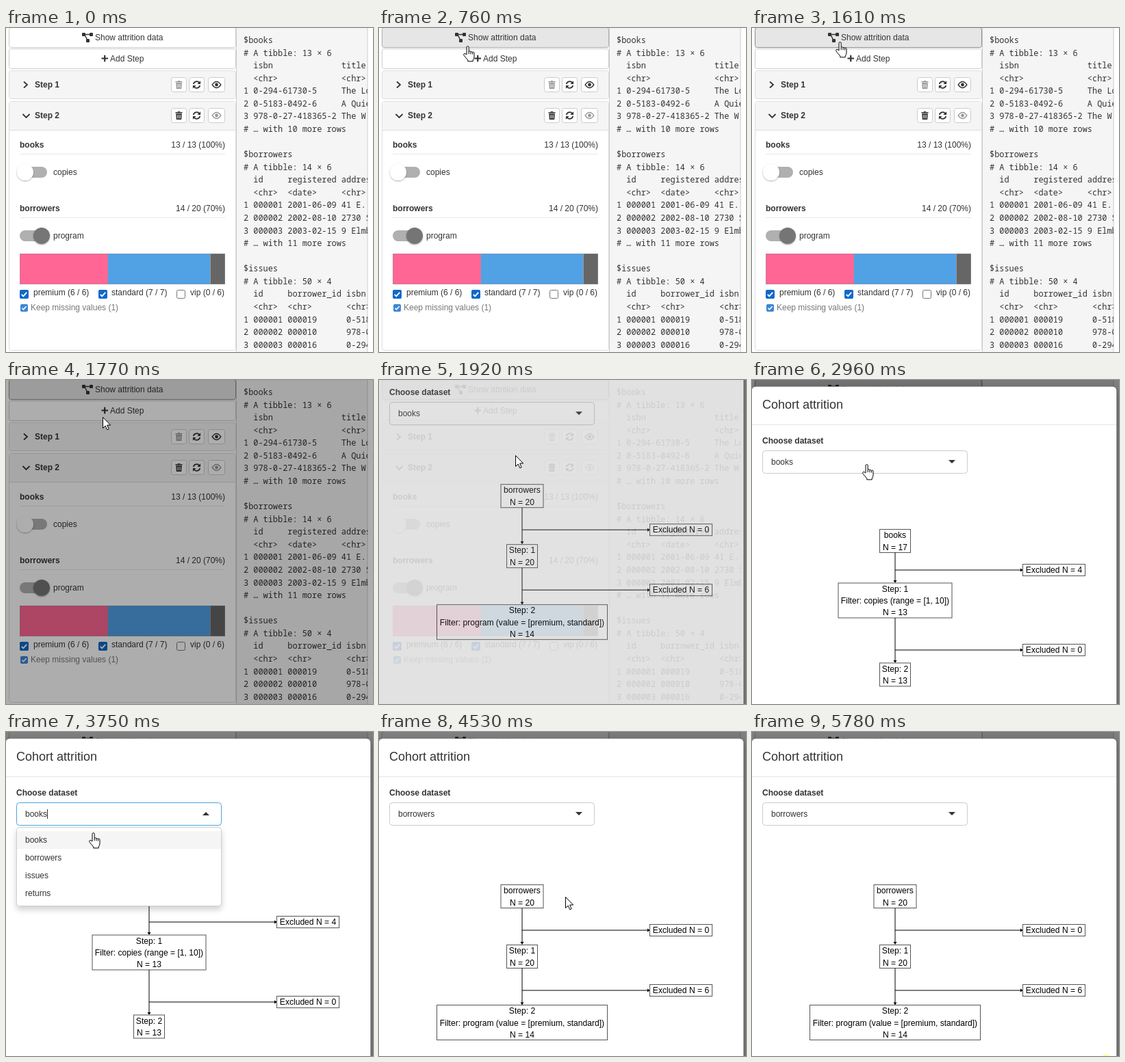
These frames come from a looping animation (536x474 px, 5850 ms). An HTML page:

```html
<!DOCTYPE html>
<html lang="en">
<head>
<meta charset="utf-8">
<title>Cohort attrition</title>
<style>
html, body { margin: 0; width: 100%; height: 100%; overflow: hidden; background: #fff; }
svg { display: block; font: 12px "Liberation Sans", Arial, sans-serif; fill: #333; }
text { white-space: pre; }
.b { font-weight: bold; }
.mono { font: 11.91px "Noto Sans Mono", "DejaVu Sans Mono", monospace; }
.line { fill: none; stroke: #333; stroke-width: 1.8; }
.graph { font-size: 12.1px; fill: #000; text-anchor: middle; }
.graph rect, .graph .edge { fill: none; stroke: #000; }
.graph rect { stroke: #555; }
</style>
</head>
<body>
<svg id="stage" width="536" height="474" viewBox="0 0 536 474"></svg>
<script>
const LOOP = 5850;

const text = (x, y, s, attrs = '') => `<text x="${x}" y="${y}" ${attrs}>${s}</text>`;
const rect = (x, y, w, h, fill, attrs = '') =>
  `<rect x="${x}" y="${y}" width="${w}" height="${h}" fill="${fill}" ${attrs}/>`;
const path = (d, attrs = '') => `<path d="${d}" ${attrs}/>`;
const at = (x, y, s, attrs = '') => `<g transform="translate(${x} ${y})" ${attrs}>${s}</g>`;

// Icons, centred on their own origin
const trash = path('M-5-5H-2L-1-6H1L2-5H5V-3.6H-5ZM-4.3-2.8H4.3L3.7 6H-3.7Z')
  + path('M-2-1V4.3M0-1V4.3M2-1V4.3', 'stroke="#fff" stroke-width=".8"');
const refresh = path('M-4.8-1A4.9 4.9 0 0 1 3.8-3M4.8 1A4.9 4.9 0 0 1-3.8 3', 'class="line"')
  + path('M5.6-5.8V-1H.8ZM-5.6 5.8V1H-.8Z');
const eye = path('M-6.3 0Q0-9 6.3 0Q0 9-6.3 0Z', 'class="line" style="stroke-width:1.4"')
  + '<circle r="2.4"/>';
const flow = path('M-5-4.5H4M-4-4L0 4', 'class="line" style="stroke-width:1.5"')
  + rect(-8, -7, 5, 5, '#333', 'rx="1"') + rect(3, -7, 5, 5, '#333', 'rx="1"')
  + rect(-2, 2, 5, 5, '#333', 'rx="1"');

const iconButton = (x, y, w, icon, off) =>
  rect(x + .5, y - 10.5, w, 21, '#fff', 'rx="3" stroke="#ccc"')
  + at(x + .5 + w / 2, y, icon, off ? 'opacity=".5"' : '');

const stepHead = (y, n, chevron, trashOff, eyeOff) =>
  path(chevron, 'class="line"') + text(42, y + 4, 'Step ' + n, 'class="b"')
  + iconButton(241, y, 22, trash, trashOff)
  + iconButton(267, y, 22, refresh)
  + iconButton(295, y, 24, eye, eyeOff);

const section = (y, name, count) =>
  text(20, y, name, 'class="b"') + text(320, y, count, 'text-anchor="end"')
  + rect(20, y + 9, 300, 1, '#e8e8e8');

const toggle = (y, on, label) =>
  rect(20, y - 8, 40, 16, '#b0b0b0', 'rx="8"')
  + `<circle cx="${on ? 52 : 28}" cy="${y}" r="12" fill="${on ? '#757575' : '#fff'}" filter="url(#soft)"/>`
  + text(69, y + 4, label);

const checkbox = (x, y, size, on) => on
  ? rect(x, y, size, size, '#0f69cc', 'rx="2"')
    + at(x, y, path('M2.8 6.8L5.3 9.3L10.2 3.8',
      `fill="none" stroke="#fff" stroke-width="1.9" transform="scale(${size / 13})"`))
  : rect(x + .5, y + .5, size - 1, size - 1, '#fff', 'rx="2" stroke="#767676"');

const panel =
  rect(4.5, 62.5, 331, 41, '#f5f5f5', 'rx="3" stroke="#ddd"')
  + rect(4.5, 107.5, 331, 364, '#fff', 'rx="3" stroke="#ddd"')
  + rect(5, 108, 330, 41, '#f5f5f5') + rect(5, 149, 330, 1, '#ddd')
  + stepHead(83, 1, 'M26 78.5L31 83L26 87.5', true, false)
  + stepHead(128, 2, 'M24.5 126L29.5 131L34.5 126', false, true)
  + section(175, 'books', '13 / 13 (100%)') + toggle(211, false, 'copies')
  + section(268, 'borrowers', '14 / 20 (70%)') + toggle(304, true, 'program')
  + rect(20, 330, 300, 45, '#999')
  + rect(20.5, 330.5, 128, 44, '#ff6695') + rect(149, 330.5, 149, 44, '#51a1e5')
  + rect(299, 330.5, 20.5, 44, '#666')
  + checkbox(20, 383, 13, true) + text(40, 391, 'premium (6 / 6)')
  + checkbox(135, 383, 13, true) + text(154, 391, 'standard (7 / 7)')
  + checkbox(249, 383, 13, false) + text(269, 391, 'vip (0 / 6)')
  + `<g opacity=".8">${checkbox(21, 404, 11, true)}</g>`
  + text(36, 413, 'Keep missing values (1)', 'fill="#777"');

const listing = `$books
# A tibble: 13 × 6
  isbn              title
  &lt;chr>             &lt;chr>
1 0-294-61730-5     The Lo
2 0-5183-0492-6     A Quie
3 978-0-27-418365-2 The W
# … with 10 more rows

$borrowers
# A tibble: 14 × 6
  id     registered addres
  &lt;chr>  &lt;date>     &lt;chr>
1 000001 2001-06-09 41 E. M
2 000002 2002-08-10 2730 S
3 000003 2003-02-15 9 Elmb
# … with 11 more rows

$issues
# A tibble: 50 × 4
  id     borrower_id isbn
  &lt;chr>  &lt;chr>       &lt;chr>
1 000001 000019      0-518
2 000002 000010      978-0
3 000003 000016      0-294`;
const output = rect(336.5, -5, 191.5, 490, '#f5f5f5', 'stroke="#ccc"')
  + `<g class="mono" clip-path="url(#outputClip)">`
  + listing.split('\n').map((s, i) => text(347, 22 + i * 18.57, s)).join('') + '</g>';

// Attrition diagrams
const node = (cx, y, w, lines) => rect(cx - w / 2, y, w, 17 * lines.length, 'none')
  + lines.map((s, i) => text(cx, y + 12.8 + i * 17.2, s)).join('');
const down = (y0, y1) => path(`M209 ${y0}V${y1 - 3}`, 'class="edge"')
  + path(`M206.5 ${y1 - 4}h5L209 ${y1}Z`);
const excluded = (y, n) => path(`M209 ${y}H393`, 'class="edge"')
  + path(`M392 ${y - 2.5}v5L396 ${y}Z`) + node(441, y - 8.5, 91, ['Excluded N = ' + n]);

const graphs = {
  books: node(209, 218.5, 45, ['books', 'N = 17']) + down(252.5, 297) + excluded(278, 4)
    + node(209, 297, 166, ['Step: 1', 'Filter: copies (range = [1, 10])', 'N = 13'])
    + down(348, 414) + excluded(395, 0) + node(209, 414, 45, ['Step: 2', 'N = 13']),
  borrowers: node(209, 223.5, 62, ['borrowers', 'N = 20']) + down(257.5, 311) + excluded(290, 0)
    + node(209, 311.5, 45, ['Step: 1', 'N = 20']) + down(345.5, 399.5) + excluded(378, 6)
    + node(209, 399.5, 249, ['Step: 2', 'Filter: program (value = [premium, standard])', 'N = 14'])
};
const graphLayer = Object.keys(graphs)
  .map(k => `<g class="graph" id="graph_${k}">${graphs[k]}</g>`).join('');

const modal =
  rect(-.5, 9.5, 533, 700, '#fff', 'rx="6" stroke="#000" stroke-opacity=".2" filter="url(#deep)"')
  + text(15, 42, 'Cohort attrition', 'font-size="18"') + rect(0, 65, 532, 1, '#e5e5e5')
  + text(15, 93, 'Choose dataset', 'class="b"')
  + graphLayer
  + rect(15.5, 103.5, 299, 33, '#fff', 'rx="4" id="select"')
  + text(28, 124, '', 'id="chosen"')
  + rect(60, 113, 1, 14, '#333', 'id="caret"')
  + path('', 'id="arrow"')
  + '<g id="menu">' + rect(15.5, 139.5, 299, 115, '#fff', 'rx="4" stroke="#d0d0d0" filter="url(#drop)"')
  + rect(16, 145, 298, 26, '#f5f5f5', 'id="row"')
  + ['books', 'borrowers', 'issues', 'returns'].map((s, i) => text(28, 162 + i * 26, s)).join('')
  + '</g>';

const arrowCursor = path('M.5 .5V16.5L4.2 13L6.8 18.8L9.2 17.7L6.7 12H11.7Z');
const handCursor = at(-5.5, 0, path('M5.5 13V2.2a1.6 1.6 0 0 1 3.2 0V8.5a1.5 1.5 0 0 1 2.8.6'
  + 'a1.5 1.5 0 0 1 2.6.6a1.3 1.3 0 0 1 2.4.8V16Q16.5 19 14.7 21V22.8H7.3V21L2 14.8'
  + 'Q.2 12.4 1.9 11.5Q3.6 11 5.5 13Z')
  + path('M8.7 8.5V12M11.5 9V12.3M14.1 9.8V12.5', 'fill="none"'));

const shadow = (id, dy, blur, alpha) => `<filter id="${id}" x="-30%" y="-30%" width="160%" height="160%">`
  + `<feDropShadow dx="0" dy="${dy}" stdDeviation="${blur}" flood-opacity="${alpha}"/></filter>`;

stage.innerHTML = '<defs><clipPath id="outputClip"><rect x="337" width="191" height="474"/></clipPath>'
  + shadow('soft', 1, 1, .35) + shadow('drop', 5, 4, .18) + shadow('deep', 4, 5, .4) + '</defs>'
  + rect(0, 0, 536, 474, '#fff')
  + rect(4.5, -.5, 331, 29, '#fff', 'rx="3" id="show"') + at(119, 14, flow)
  + text(130, 18, 'Show attrition data')
  + rect(4.5, 30.5, 331, 29, '#fff', 'rx="3" id="add"')
  + path('M139.5 44.5H149M144.2 39.7V49.3', 'class="line" style="stroke-width:2.2"')
  + text(152, 49, 'Add Step')
  + panel + output
  + rect(0, 0, 536, 474, '#000', 'id="shade"')
  + `<g id="modal">${modal}</g>`
  + '<ellipse id="glow" cx="517" cy="476" rx="7" ry="4" fill="#ffff66" opacity=".7"/>'
  + `<g id="cursor" fill="#fff" stroke="#000"><g id="pointer">${arrowCursor}</g><g id="hand">${handCursor}</g></g>`;

const $ = id => document.getElementById(id);
const set = (id, attrs) => { for (const k in attrs) $(id).setAttribute(k, attrs[k]); };
const show = (id, on) => set(id, { visibility: on ? 'visible' : 'hidden' });
const clamp = v => Math.max(0, Math.min(1, v));

// Motion advances in bursts of evenly spaced steps: start, end, count
const bursts = [[140, 720, 8], [760, 940, 3], [1610, 2160, 8], [2640, 3030, 6],
  [3430, 3520, 2], [3750, 4070, 5], [4210, 4530, 5], [5140, 5380, 4]];
function held(t) {
  let h = 0;
  for (const [a, b, n] of bursts) {
    if (t < a) break;
    const k = Math.min(n - 1, Math.floor((t - a + 8) / (b - a) * (n - 1)));
    h = a + k * (b - a) / (n - 1);
  }
  return h;
}

// Pointer path: time, x, y
const route = [[140, 440, 325], [400, 285, 165], [720, 131, 36], [760, 128, 26], [940, 127, 20],
  [1610, 127, 20], [1689, 130, 30], [1767, 141, 54], [1924, 199, 110], [2003, 222, 143],
  [2160, 240, 167], [2562, 240, 167], [3030, 151, 114], [3430, 151, 114], [3520, 146, 109],
  [3750, 126, 147], [4070, 122, 193], [4210, 122, 193], [4530, 272, 241], [5060, 272, 241],
  [5300, 421, 462], [5380, 460, 520]];
function position(t) {
  const i = route.findIndex(p => p[0] >= t);
  if (i < 1) return route[i < 0 ? route.length - 1 : 0].slice(1);
  const [a, b] = [route[i - 1], route[i]], f = (t - a[0]) / (b[0] - a[0]);
  return [a[1] + (b[1] - a[1]) * f, a[2] + (b[2] - a[2]) * f];
}

const paint = (id, fill, stroke) => set(id, { fill, stroke });

function draw(t) {
  const h = held(t), [x, y] = position(h);
  const present = t >= 140 && y < 474;
  const open = t >= 3430 && t < 4210, picked = t >= 4210;

  const overButtons = present && h < 1750 && x < 336 && y < 60;
  const overSelect = h > 2100 && x < 314 && y > 103 && y < (open ? 254 : 137);
  const hand = overButtons || overSelect;
  show('cursor', present);
  set('cursor', { transform: `translate(${Math.round(x)} ${Math.round(y)})` });
  set('hand', { display: hand ? 'inline' : 'none' });
  set('pointer', { display: hand ? 'none' : 'inline' });

  if (t >= 1460 && t < 1610) paint('show', '#d4d4d4', '#8c8c8c');
  else if (t >= 1610 && t < 3430) paint('show', '#e6e6e6', '#8c8c8c');
  else if (overButtons && y < 30) paint('show', '#e6e6e6', '#adadad');
  else paint('show', '#fff', '#ccc');
  const addHover = overButtons && y >= 30 && h < 1000;
  paint('add', addHover ? '#e6e6e6' : '#fff', addHover ? '#adadad' : '#ccc');

  // Backdrop fades first, then the dialog slides down
  set('shade', { opacity: .5 * clamp((h - 1671) / 150) });
  const slide = -163 * (1 - clamp((h - 1808) / 300)) ** 1.7;
  set('modal', { opacity: clamp((h - 1808) / 150), transform: `translate(0 ${slide})` });

  paint('select', '#fff', open ? '#4ba3e0' : '#ccc');
  $('chosen').textContent = picked ? 'borrowers' : 'books';
  set('arrow', { d: open ? 'M287 122H297L292 117Z' : 'M287 117H297L292 122Z' });
  for (const id of ['caret', 'menu']) set(id, { display: open ? 'inline' : 'none' });
  set('row', { y: y >= 171 ? 171 : 145 });

  const books = t >= 2390 && t < 4450;
  set('graph_books', { display: books ? 'inline' : 'none' });
  set('graph_borrowers', { display: books ? 'none' : 'inline' });
  show('glow', t >= 5780);
}

const start = performance.now();
function tick() {
  draw((performance.now() - start) % LOOP);
  requestAnimationFrame(tick);
}
tick();
</script>
</body>
</html>
```
